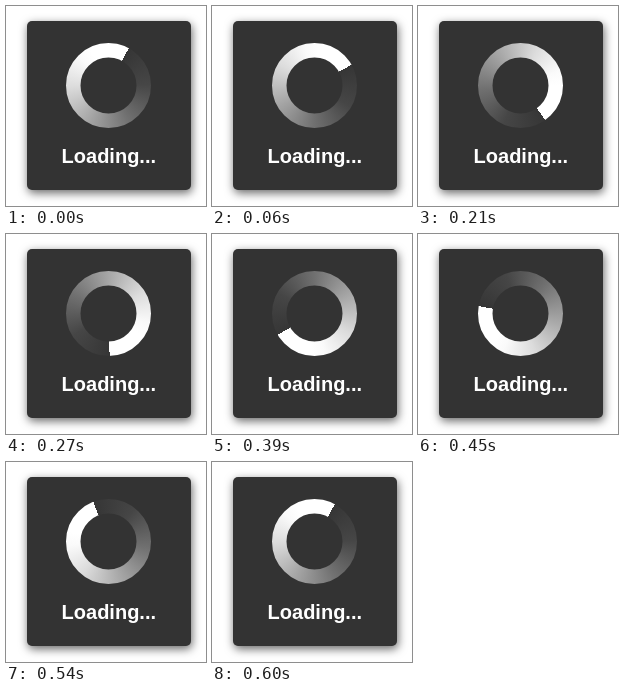
These frames come from a looping animation (200 by 200 pixels, 0.63 s). An HTML page with a canvas:

```html
<!DOCTYPE html>
<html lang="en">
<head>
<meta charset="utf-8">
<title>Loading</title>
<style>
  html, body { margin: 0; width: 100%; height: 100%; overflow: hidden; background: #fff; }
  .panel {
    position: absolute; left: 21px; top: 15px; width: 164px; height: 169px;
    border-radius: 5px; background: #333; box-shadow: 1px 3px 10px rgba(0, 0, 0, .6);
  }
  canvas, svg { position: absolute; left: 0; top: 0; }
  text { font: bold 20px "Liberation Sans", Arial, sans-serif; fill: #fff; }
</style>
</head>
<body>
<div class="panel"></div>
<canvas width="200" height="200"></canvas>
<svg width="200" height="200"><text x="55.6" y="157">Loading...</text></svg>
<script>
const ctx = document.querySelector('canvas').getContext('2d');
const STEP = 30, STEPS = 21;
const CX = 102.5, CY = 79.5, OUTER = 42.5, INNER = 28;

// [step, degrees clockwise from the top] of the bright end
const turns = [[0, 28.5], [4, 93], [9, 178.5], [13, 240], [16, 300], [18, 339], [20, 388.5]];
// [degrees past the bright end, grey level]
const tones = [[0, 54], [60, 70], [120, 112], [180, 165], [240, 220], [285, 250], [305, 255], [360, 255]];

function interpolate(points, x) {
  const i = Math.max(1, points.findIndex(p => p[0] >= x));
  const [x0, y0] = points[i - 1], [x1, y1] = points[i];
  return y0 + (y1 - y0) * (x - x0) / (x1 - x0);
}

function draw() {
  const step = Math.floor(performance.now() / STEP) % STEPS;
  const angle = (interpolate(turns, step) - 90) * Math.PI / 180;
  const sweep = ctx.createConicGradient(angle, CX, CY);
  for (const [deg, v] of tones) sweep.addColorStop(deg / 360, `rgb(${v}, ${v}, ${v})`);

  ctx.clearRect(0, 0, 200, 200);
  ctx.strokeStyle = sweep;
  ctx.lineWidth = OUTER - INNER;
  ctx.beginPath();
  ctx.arc(CX, CY, (OUTER + INNER) / 2, 0, Math.PI * 2);
  ctx.stroke();
  requestAnimationFrame(draw);
}
draw();
</script>
</body>
</html>
```
